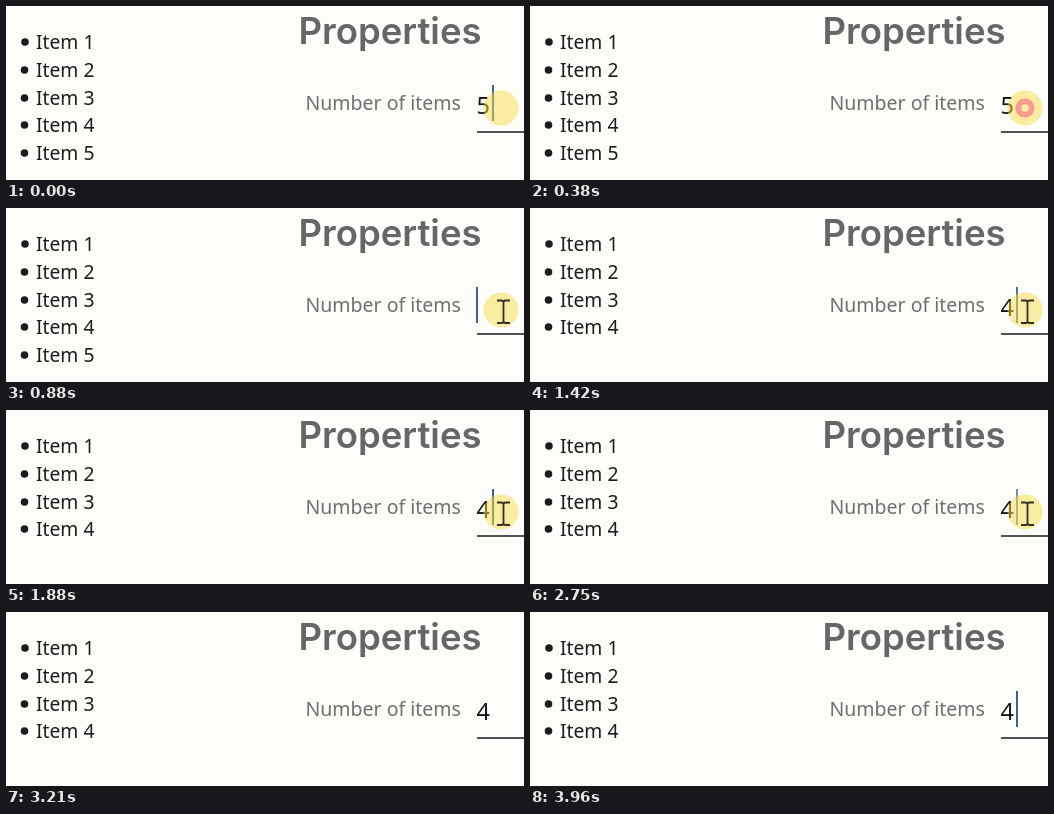
Recreate the animation shown at these times as an HTML page. Size 518x174 px, loop 4000 ms.

```html
<!DOCTYPE html>
<html lang="en">
<head>
<meta charset="utf-8">
<title>Number of items</title>
<style>
  html, body { margin: 0; width: 100%; height: 100%; overflow: hidden; background: #fdfdfa; }
  svg { display: block; width: 518px; height: 174px; }
  text { font-family: "Noto Sans", "Open Sans", sans-serif; }

  .items { font-size: 19.3px; fill: #1c1c1e; }
  .heading { font-family: Inter, "Noto Sans", sans-serif; font-size: 36.5px; font-weight: 600; fill: #666668; }
  .label { font-size: 19.5px; fill: #6f6f70; }
  .value { font-size: 23.5px; fill: #161618; }
  .rule { fill: #525258; }

  .last, .old, .new, .caret, .slot, .pointer, .beam, .ring {
    animation: 4s linear infinite both;
  }
  .last { animation-name: last; animation-timing-function: step-end; }
  .old { animation-name: old; animation-timing-function: step-end; }
  .new { animation-name: new; animation-timing-function: step-end; }
  .slot { animation-name: slot; animation-timing-function: step-end; }
  .beam { animation-name: beam; animation-timing-function: step-end; }
  .caret { animation-name: blink; fill: #3f5f96; }
  .pointer { animation-name: leave; }
  .ring { animation-name: press; fill: none; stroke: #f5828c; stroke-width: 5.8px; }
  .halo { fill: #f8dc48; fill-opacity: .5; }
  .beam path { fill: none; stroke: #33302a; stroke-width: 1.8px; }

  @keyframes last { 0% { opacity: 1; } 24.5%, 100% { opacity: 0; } }
  @keyframes old { 0% { opacity: 1; } 16.75%, 100% { opacity: 0; } }
  @keyframes new { 0% { opacity: 0; } 24%, 100% { opacity: 1; } }
  @keyframes beam { 0% { opacity: 0; } 14.75%, 100% { opacity: 1; } }

  /* the caret jumps to the start while the field is empty */
  @keyframes slot {
    0% { transform: translateX(0); }
    16.75% { transform: translateX(-16px); }
    24%, 100% { transform: translateX(0); }
  }

  @keyframes blink {
    0%, 3.25% { opacity: 1; }
    4.25%, 15.75% { opacity: 0; }
    16.75%, 35.25% { opacity: 1; }
    37.5%, 41.5% { opacity: 0; }
    43.75%, 49.75% { opacity: 1; }
    50.25%, 53% { opacity: 0; }
    54.25%, 62.25% { opacity: 1; }
    62.5%, 66.5% { opacity: 0; }
    69.75%, 79% { opacity: 1; }
    80.25%, 85.25% { opacity: 0; }
    87.5%, 91.5% { opacity: 1; }
    93.75%, 97.5% { opacity: 0; }
    98.5%, 100% { opacity: 1; }
  }

  @keyframes press {
    0%, 7.25% { opacity: 0; r: 3px; }
    8.25% { opacity: .8; r: 5px; }
    9.5% { opacity: .75; r: 6.7px; }
    14.75%, 100% { opacity: 0; r: 13px; }
  }

  @keyframes leave {
    0%, 70% { transform: translate(0, 0); animation-timing-function: ease-in; }
    78%, 100% { transform: translate(4px, 95px); }
  }
</style>
</head>
<body>
<svg viewBox="0 0 518 174">
  <g class="items">
    <circle cx="19" cy="36" r="3.8"/><text x="30" y="43">Item 1</text>
    <circle cx="18.5" cy="64" r="3.8"/><text x="30" y="71">Item 2</text>
    <circle cx="18.5" cy="92" r="3.8"/><text x="30" y="99">Item 3</text>
    <circle cx="18.5" cy="119" r="3.8"/><text x="30" y="126">Item 4</text>
    <g class="last"><circle cx="18.5" cy="147" r="3.8"/><text x="30" y="154">Item 5</text></g>
  </g>

  <text class="heading" x="292.5" y="37.5">Properties</text>
  <text class="label" x="299.5" y="104">Number of items</text>

  <g class="value">
    <text class="old" x="470.5" y="108">5</text>
    <text class="new" x="470.5" y="108">4</text>
  </g>
  <rect class="rule" x="471" y="125" width="47" height="2"/>
  <g class="slot"><rect class="caret" x="486" y="79" width="2" height="36"/></g>

  <g class="pointer">
    <circle class="halo" cx="495" cy="102" r="17.5"/>
    <circle class="ring" cx="495" cy="102" r="3"/>
    <g class="beam">
      <path d="M491 92.5h4.5q2 0 2 2q0-2 2-2h4.5M497.5 94v20M491 115h4.5q2 0 2-2q0 2 2 2h4.5"/>
    </g>
  </g>
</svg>
</body>
</html>
```
